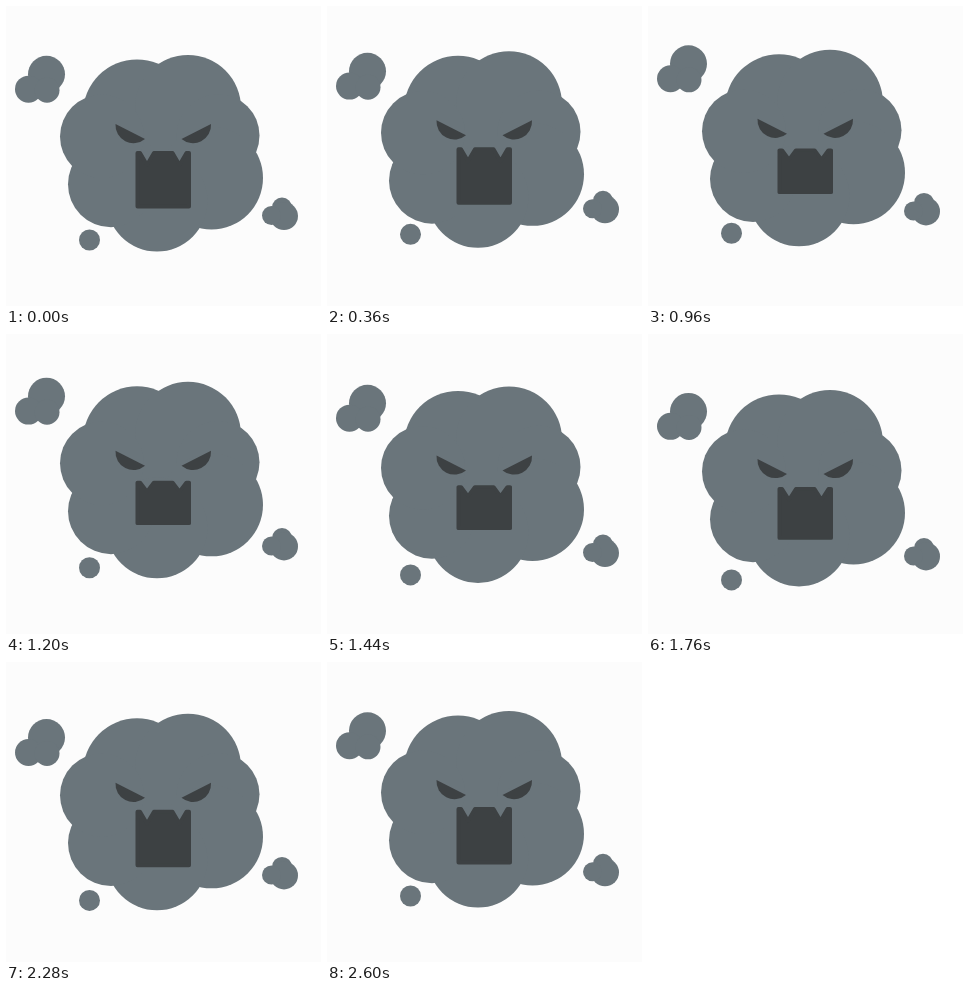
Write an HTML page that moves like this. It is 315 px wide and 300 px high and loops after 2640 ms.

```html
<!DOCTYPE html>
<html lang="en">
<head>
<meta charset="utf-8">
<title>Angry cloud</title>
<style>
  html, body { margin: 0; width: 100%; height: 100%; overflow: hidden; background: #fcfcfc; }
  svg { display: block; width: 315px; height: 300px; fill: #6a757b; }
  .face { fill: #3d4143; }
  #mouth { stroke: #3d4143; stroke-width: 4; stroke-linejoin: round; }
</style>
</head>
<body>
<svg viewBox="0 0 315 300">
  <g id="puffLeft">
    <circle cx="40.5" cy="67.3" r="18.5"/>
    <circle cx="22.5" cy="82.2" r="13.5"/>
    <circle cx="41" cy="83.3" r="12.5"/>
  </g>
  <g id="puffRight">
    <circle cx="276" cy="202" r="10"/>
    <circle cx="278" cy="210.5" r="14"/>
    <circle cx="265.5" cy="210" r="9.5"/>
  </g>
  <circle id="dot" cx="83.5" cy="234" r="10.5"/>
  <g id="cloud">
    <circle cx="131" cy="107.5" r="54"/>
    <circle cx="182" cy="102" r="53"/>
    <circle cx="212" cy="129.5" r="41.5"/>
    <circle cx="205.5" cy="172" r="51.5"/>
    <circle cx="151" cy="195" r="50.5"/>
    <circle cx="105" cy="178.3" r="43"/>
    <circle cx="96" cy="130.5" r="42"/>
    <g class="face">
      <path id="eye" d="M109.5 118A18 18 0 0 0 139 133Z"/>
      <use href="#eye" transform="matrix(-1 0 0 1 314.5 0)"/>
      <path id="mouth" d="M131.5 147H134L141 159L148 147H166.5L173.5 159L180.5 147H183V200.5H131.5Z"/>
    </g>
  </g>
</svg>
<script>
const LOOP = 2640, TOP_TIME = 700, BOTTOM_TIME = 1820;
const MOUTH_PIVOT = 158;

const byId = id => document.getElementById(id);
const ease = p => (1 - Math.cos(Math.PI * Math.min(1, Math.max(0, p)))) / 2;

// Vertical offset: up from rest, down past it, and back to rest.
function bob(t, up, down) {
  if (t < TOP_TIME) return -up * ease(t / TOP_TIME);
  if (t < BOTTOM_TIME) return -up + (up + down) * ease((t - TOP_TIME) / (BOTTOM_TIME - TOP_TIME));
  return down * ease((LOOP - t) / (LOOP - BOTTOM_TIME));
}

function move(id, time, delay, up, down) {
  const y = bob((time - delay + LOOP) % LOOP, up, down);
  byId(id).setAttribute("transform", `translate(0 ${y})`);
}

function draw() {
  const t = performance.now() % LOOP;
  move("cloud", t, 0, 7, 7);
  move("dot", t, -20, 10, 12);
  move("puffLeft", t, 150, 10, 12);
  move("puffRight", t, -90, 10, 12);

  // The mouth closes partly around the middle of the loop.
  const s = 1 - 0.23 * ease((800 - Math.abs(t - 1230)) / 660);
  byId("mouth").setAttribute("transform", `translate(0 ${MOUTH_PIVOT * (1 - s)}) scale(1 ${s})`);
  requestAnimationFrame(draw);
}
draw();
</script>
</body>
</html>
```
